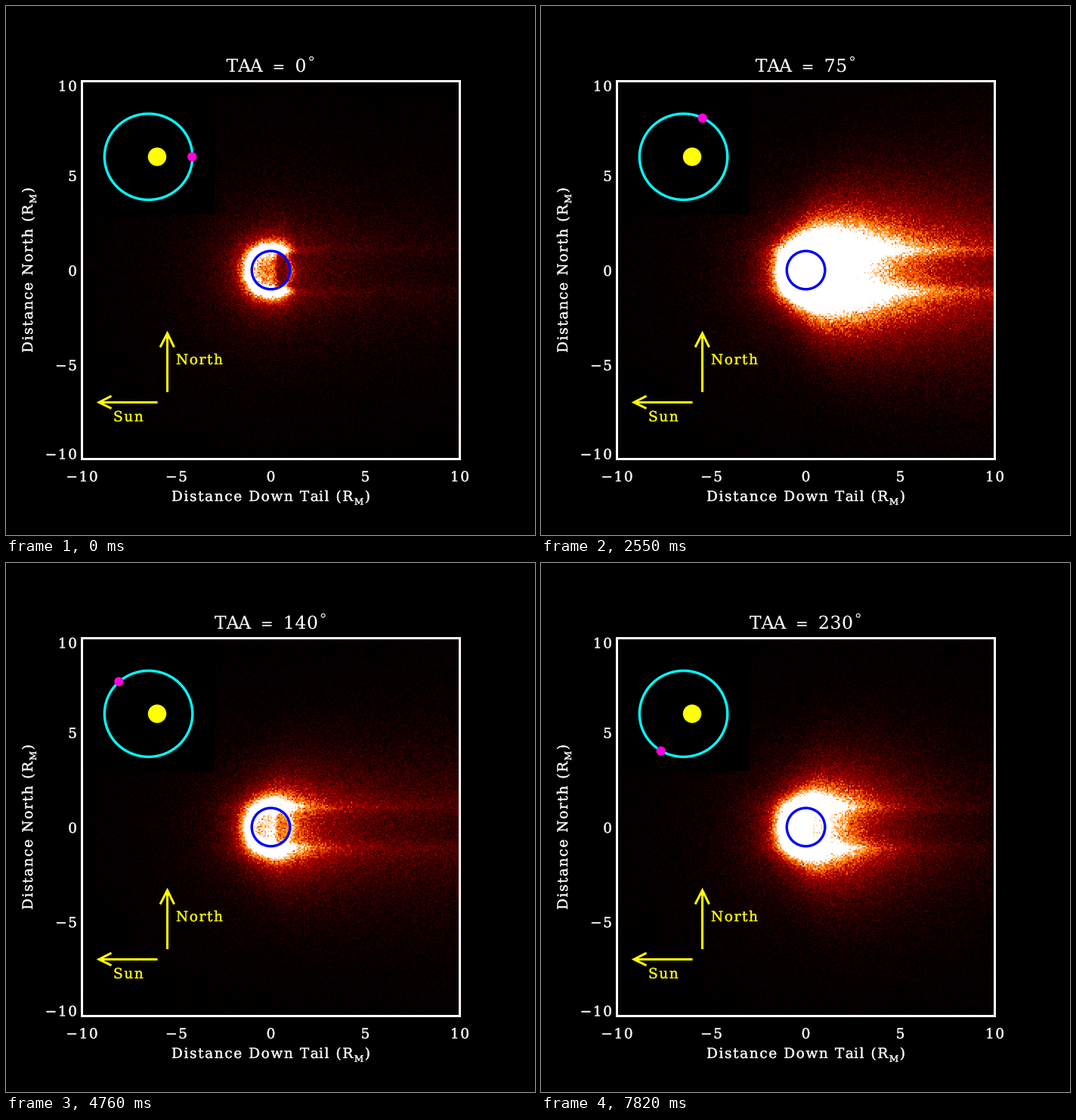
A matplotlib script that plays this animation: 700x700 px, repeating every 7990 ms.

```python
import numpy as np
import matplotlib.pyplot as plt
from matplotlib.animation import FuncAnimation
from matplotlib.patches import Circle, Ellipse, PathPatch, Rectangle
from matplotlib.path import Path
from matplotlib.textpath import TextPath
from matplotlib.transforms import Affine2D

FRAMES, STEP_MS, STEP_DEG = 47, 170, 5
FONT = {"family": "DejaVu Serif"}
PX = 0.72  # points per pixel at 100 dpi
SUN = (200, 199.5)
AXIS, ECC = 58.2, 0.2056

# True anomaly against near-planet cloud, long tail and halo strength
KNOTS = [0, 20, 35, 55, 75, 95, 120, 140, 160, 180, 200, 215, 230]
CLOUD = [.03, .15, .55, 1.0, .98, .92, .83, .35, .05, .02, .02, .20, .70]
TAIL = [.20, .35, .65, 1.0, 1.0, .90, .70, .50, .33, .15, .05, .10, .18]
HALO = [1.0, 1.05, 1.1, 1.2, 1.2, 1.2, 1.1, .90, .80, .80, .85, 1.0, 1.1]

fig = plt.figure(figsize=(7, 7), dpi=100, facecolor="black")
ax = fig.add_axes([0, 0, 1, 1])
ax.axis("off")


# ---------- text ----------
def advance(s, size):
    bar = TextPath((0, 0), "|", size=size, prop=FONT).get_extents().x1
    return TextPath((0, 0), s + "|", size=size, prop=FONT).get_extents().x1 - bar


def layout(runs, track):
    """Set (text, size, rise) runs in one line; return the path and width."""
    glyphs, x = [], 0
    for s, size, rise in runs:
        for k, ch in enumerate(s):
            if ch != " ":
                pos = x + advance(s[:k], size) + k * track
                glyphs.append(TextPath((pos, rise), ch, size=size, prop=FONT))
        x += advance(s, size) + len(s) * track
    return Path.make_compound_path(*glyphs), x - track


def text(x, y, runs, size=18.5, align=0.5, angle=0, color="white", track=1.6,
         weight=0.45):
    if isinstance(runs, str):
        runs = [(runs, size, 0)]
    path, width = layout(runs, track)
    move = Affine2D().translate(-align * width, 0).scale(1, -1)
    move.rotate_deg(-angle).translate(x, y)
    patch = PathPatch(move.transform_path(path), fc=color, ec=color,
                      lw=weight * PX, snap=False, zorder=5)
    return ax.add_patch(patch)


def axis_title(s):
    return [(s + " (R", 18.5, 0), ("M", 12, -5), (")", 18.5, 0)]


# ---------- sodium cloud ----------
def sigmoid(v):
    return 1 / (1 + np.exp(-np.clip(v, -40, 40)))


grid = (np.arange(250) + 0.5) / 12.5 - 10
X, Y = np.meshgrid(grid, -grid)
R = np.hypot(X, Y)
AY = np.abs(Y)
INSET = (X < -2.96) & (Y > 2.96)

# Halo outside the disc, squeezed down-tail and dark inside the shadow
stretched = np.hypot(np.where(X > 0, 0.75 * X, X), Y)
shadow = sigmoid((X - 0.3) / 0.07) * sigmoid((0.95 - AY) / 0.05)
outer = 3.3 * np.maximum(stretched, 0.9) ** -4.0
outer *= 0.2 + 0.8 * sigmoid((1 - X) / 0.2)
outer = outer * (1 - 0.85 * shadow) + 0.25 * np.exp(-R / 2.5)
inner = (0.68 + 0.5 * R ** 4) * (1 - 0.75 * shadow)
NEAR = np.where(R < 1, inner, outer)

# Cross profile of the tail: wings that widen with distance, faint ridges,
# a dip in the shadow
wing = 1 + 0.18 * np.maximum(X, -2)
PROFILE = np.exp(-np.maximum(AY - 1.1, 0) / wing)
PROFILE *= 1 - 0.35 * np.exp(-(Y / 0.85) ** 4)
PROFILE *= 1 + 0.08 * np.exp(-((AY - 1.1) / 0.2) ** 2)
PROFILE *= sigmoid((X - 0.2) / 0.6)


def heat(v):
    level = 255 * np.clip(v, 0, 1)
    rgb = np.stack([level / 176, (level - 120) / 135, (level - 190) / 65], -1)
    return np.clip(rgb, 0, 1)


def cloud(i):
    taa = i * STEP_DEG
    a, t, h = (np.interp(taa, KNOTS, c) for c in (CLOUD, TAIL, HALO))
    along = 3.2 * a * np.exp(-X / (0.9 + 2 * a)) + 0.75 * t * np.exp(-X / 14)
    light = h * NEAR + PROFILE * along
    light = np.random.default_rng(100 + i).poisson(80 * light) / 80
    light[INSET] = 0
    return heat(light)


# ---------- fixed parts ----------
image = ax.imshow(cloud(0), extent=(100, 600, 600, 100), aspect="auto",
                  interpolation="nearest", zorder=1)
ax.set_xlim(0, 700)
ax.set_ylim(700, 0)

ax.add_patch(Rectangle((100.5, 99.5), 500, 500, fill=False, ec="white",
                       lw=3 * PX, joinstyle="miter", snap=False, zorder=4))
ax.add_patch(Circle((350.5, 349.5), 25.3, fill=False, ec="#0000ff",
                    lw=3.4 * PX, zorder=3))
ax.add_patch(Ellipse((SUN[0] - AXIS * ECC + 0.5, SUN[1]), 2 * AXIS,
                     2 * AXIS * np.sqrt(1 - ECC ** 2), fill=False, ec="cyan",
                     lw=3.4 * PX, zorder=3))
ax.add_patch(Circle(SUN, 12.2, fc="yellow", lw=0, zorder=3))
planet = ax.add_patch(Circle(SUN, 6.1, fc="#ff00dc", lw=0, zorder=4))

for points in ([(213.5, 511), (213.5, 433)], [(204, 451.5), (213.5, 433), (222.5, 451.5)],
               [(200.5, 524.5), (123, 524.5)], [(139.5, 516), (123, 524.5), (139.5, 532.5)]):
    ax.plot(*zip(*points), color="yellow", lw=3 * PX, zorder=4, snap=False,
            solid_capstyle="butt", solid_joinstyle="miter")
text(225, 474, "North", align=0, color="yellow")
text(142, 549.5, "Sun", align=0, color="yellow")

for k, y in zip((-10, -5, 0, 5, 10), (593, 475.5, 350.5, 225, 106)):
    mark = str(k).replace("-", "\u2212")
    text(350.5 + 25 * k, 629, mark)
    text(94, y + 6.5, mark, align=1)
text(350.5, 655, axis_title("Distance Down Tail"))
text(35, 349.5, axis_title("Distance North"), angle=90)

# ---------- moving parts ----------
title = []


def draw_title(taa):
    while title:
        title.pop().remove()
    digits = str(taa)
    x = 299.3 - 7.8 * len(digits)
    for dx, s, size, track in ((0, "TAA", 23.5, 0), (61, "=", 20, 0),
                               (91, digits, 23.5, 0.6)):
        title.append(text(x + dx, 87, s, size, align=0, track=track, weight=0.1))
    end = x + 97 + 15.6 * len(digits)
    title.append(ax.add_patch(Circle((end, 69.5), 2.4, fill=False, ec="white",
                                     lw=1.1 * PX, zorder=5)))


def update(i):
    taa = i * STEP_DEG
    angle = np.radians(taa)
    r = AXIS * (1 - ECC ** 2) / (1 + ECC * np.cos(angle))
    planet.center = (SUN[0] + r * np.cos(angle), SUN[1] - r * np.sin(angle))
    image.set_data(cloud(i))
    draw_title(taa)
    return [image, planet, *title]


anim = FuncAnimation(fig, update, frames=FRAMES, interval=STEP_MS,
                     init_func=lambda: update(0), repeat=True, repeat_delay=0,
                     blit=False)
plt.show()
```
